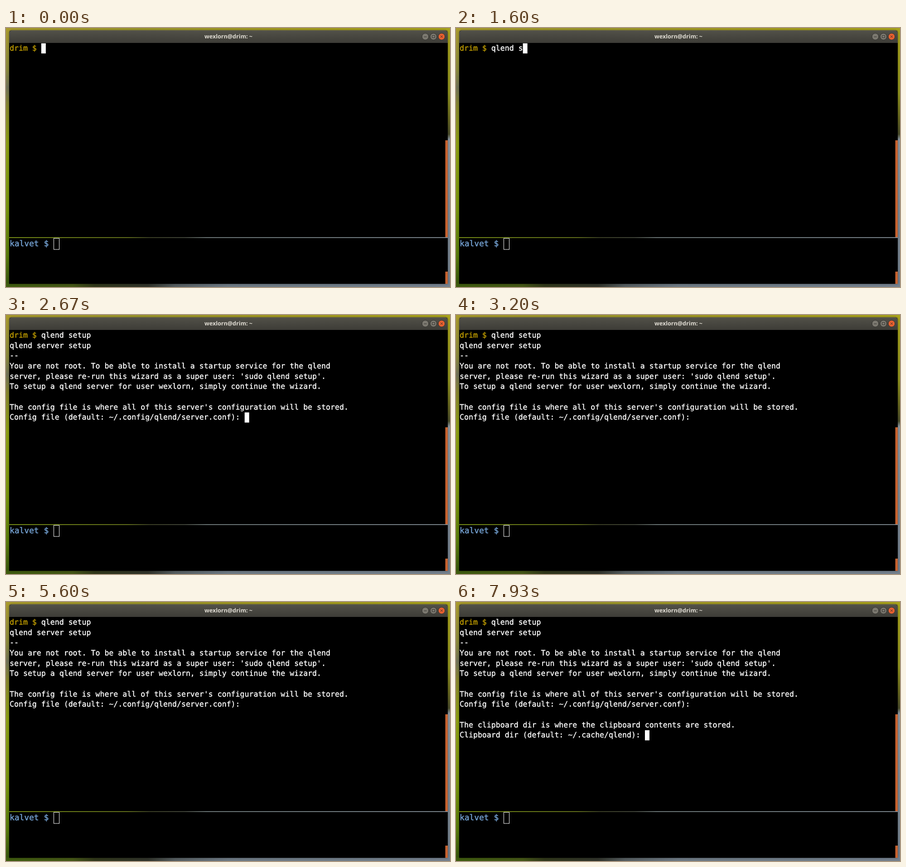
Write an HTML page with a canvas that moves like this. It is 980x572 px and loops after 8000 ms.

```html
<!DOCTYPE html>
<html lang="en">
<head>
<meta charset="utf-8">
<title>Terminal</title>
<style>
  html, body { margin: 0; width: 980px; height: 572px; overflow: hidden; background: #000; }
  canvas, pre, #title { position: absolute; margin: 0; }
  canvas { left: 0; top: 0; }
  pre, #title { text-rendering: geometricPrecision; white-space: pre; }
  pre { left: 8px; color: #fff; font-family: "DejaVu Sans Mono", monospace; font-variant-ligatures: none; }
  #main { top: 34px; font-size: 16.57px; line-height: 22.67px; -webkit-text-stroke: 0.35px; }
  #side { top: 464px; font-size: 17.9px; line-height: 25px; color: #729fcf; -webkit-text-stroke: 0.5px; }
  #main .prompt { color: #c4a000; }
  #title { left: 7px; top: 5px; width: 968px; text-align: center; color: #dfdbd2;
           font: bold 12.6px/27px "Open Sans", sans-serif; }
</style>
</head>
<body>
<canvas id="stage" width="980" height="572"></canvas>
<div id="title">wexlorn@drim: ~</div>
<pre id="main"><span class="prompt">drim $ </span><span id="output"></span></pre>
<pre id="side">kalvet $ </pre>
<script>
const LOOP = 8000, OUTPUT_AT = 2670, NEXT_AT = 7930;
const CELL = 9.975, ROW = 22.67, PROMPT_LENGTH = 7;
const COMMAND = "qlend setup";
const KEY_TIMES = [470, 730, 870, 1000, 1070, 1200, 1600, 1730, 1930, 2070, 2130];
const INTRO = `
qlend server setup
--
You are not root. To be able to install a startup service for the qlend
server, please re-run this wizard as a super user: 'sudo qlend setup'.
To setup a qlend server for user wexlorn, simply continue the wizard.

The config file is where all of this server's configuration will be stored.
Config file (default: ~/.config/qlend/server.conf): `;
const NEXT = `

The clipboard dir is where the clipboard contents are stored.
Clipboard dir (default: ~/.cache/qlend): `;

const ctx = document.getElementById("stage").getContext("2d");
const output = document.getElementById("output");

function rect(color, x, y, w, h) {
  ctx.fillStyle = color;
  ctx.fillRect(x, y, w, h);
}

function roundTop(color, x, y, w, h) {
  ctx.beginPath();
  ctx.roundRect(x, y, w, h, [6, 6, 0, 0]);
  ctx.fillStyle = color;
  ctx.fill();
}

function gradient(x0, y0, x1, y1, stops) {
  const g = ctx.createLinearGradient(x0, y0, x1, y1);
  for (const [at, color] of stops) g.addColorStop(at, color);
  return g;
}

function drawBackdrop() {
  const across = stops => gradient(0, 0, 980, 0, stops);
  const down = stops => gradient(0, 0, 0, 572, stops);
  rect(across([[0, "#a99b2d"], [0.3, "#9c972c"], [0.6, "#a39a22"], [1, "#a9a31c"]]), 0, 0, 980, 6);
  rect(down([[0, "#a99b2d"], [0.16, "#8b8a3c"], [0.23, "#727358"], [0.3, "#87862c"],
             [0.45, "#8d9f12"], [0.7, "#78940c"], [0.88, "#587a0a"], [1, "#34520c"]]), 0, 5, 8, 567);
  rect(down([[0, "#a9a31c"], [0.25, "#8e911e"], [0.35, "#65651f"], [0.41, "#494b2b"],
             [0.43, "#8b969f"], [0.7, "#7c8994"], [1, "#717f8c"]]), 974, 5, 6, 567);
  rect(across([[0, "#3f5c0e"], [0.15, "#455716"], [0.2, "#30371a"], [0.32, "#30332a"],
               [0.38, "#555d60"], [0.5, "#6d7984"], [1, "#74818e"]]), 0, 564, 980, 8);
}

function drawButton(x, fill, glyph) {
  ctx.beginPath();
  ctx.arc(x, 19, 7.3, 0, Math.PI * 2);
  ctx.fillStyle = fill;
  ctx.fill();
  ctx.lineWidth = 1;
  ctx.strokeStyle = "#33322e";
  ctx.stroke();
  ctx.beginPath();
  glyph(x, 19);
  ctx.stroke();
}

function drawWindow() {
  ctx.save();
  ctx.shadowColor = "rgba(0, 0, 0, 0.35)";
  ctx.shadowBlur = 5;
  roundTop("#000", 7, 5, 968, 560);
  ctx.restore();
  roundTop(gradient(0, 5, 0, 33, [[0, "#5a584e"], [0.1, "#504f47"], [1, "#3d3c37"]]), 7, 5, 968, 28);

  drawButton(925.5, "#7b786f", (x, y) => { ctx.moveTo(x - 3, y + 0.5); ctx.lineTo(x + 3, y + 0.5); });
  drawButton(943.5, "#7b786f", (x, y) => ctx.rect(x - 3, y - 2.5, 6, 5));
  drawButton(961.5, "#e9602f", (x, y) => {
    for (const d of [-2.5, 2.5]) { ctx.moveTo(x - 2.5, y - d); ctx.lineTo(x + 2.5, y + d); }
  });

  rect("#c7622f", 969.6, 248, 5.4, 214);
  rect("#c7622f", 969.6, 538, 5.4, 27);
  rect(gradient(7, 0, 975, 0, [[0, "#87a019"], [0.27, "#71801f"], [0.32, "#44482a"],
                               [0.4, "#4a4e42"], [0.45, "#7b8788"], [1, "#8c98a1"]]), 7, 462, 968, 1.7);
  ctx.strokeStyle = "#fff";
  ctx.strokeRect(105.5, 464.5, 12, 24.6);
}

function textAt(t) {
  const typed = COMMAND.slice(0, KEY_TIMES.filter(k => k <= t).length);
  return typed + (t >= OUTPUT_AT ? INTRO : "") + (t >= NEXT_AT ? NEXT : "");
}

function cursorOn(t) {
  if (t < OUTPUT_AT) return t < 70 || t >= 400;
  return t < 3200 || t >= NEXT_AT || Math.floor((t - 3200) / 600) % 2 === 1;
}

function drawCursor(text) {
  const lines = text.split("\n"), row = lines.length - 1;
  const col = lines[row].length + (row ? 0 : PROMPT_LENGTH);
  rect("#fff", 8 + col * CELL, 33.8 + row * ROW, 10, 22.4);
}

function render(t) {
  const text = textAt(t);
  if (output.textContent !== text) output.textContent = text;
  ctx.clearRect(0, 0, 980, 572);
  drawBackdrop();
  drawWindow();
  if (cursorOn(t)) drawCursor(text);
}

const start = performance.now();
function tick() {
  render((performance.now() - start) % LOOP);
  requestAnimationFrame(tick);
}
tick();
</script>
</body>
</html>
```
